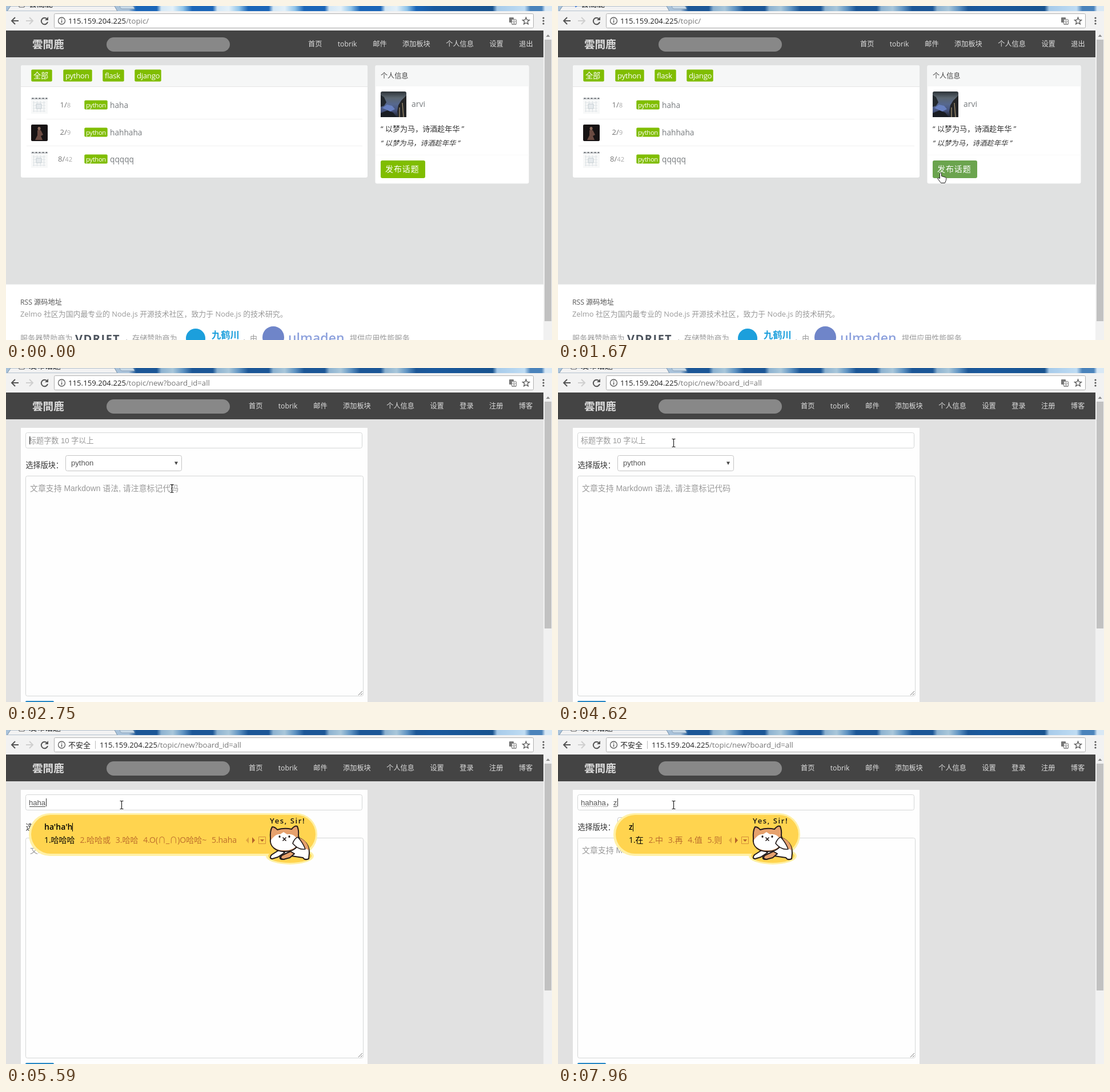
Recreate the animation shown at these times as an HTML page with a canvas. Size 956 by 586 pixels, loop 8 s.

```html
<!DOCTYPE html>
<html lang="zh-CN">
<head>
<meta charset="utf-8">
<title>发布话题</title>
<style>
html, body { margin: 0; width: 100%; height: 100%; overflow: hidden; background: #e1e1e1; }
canvas { display: block; }
</style>
</head>
<body>
<canvas id="stage" width="956" height="586"></canvas>
<script>
const ctx = document.getElementById('stage').getContext('2d');
const LOOP = 8000;
const UI = '"Open Sans", "Noto Sans CJK SC", "Noto Sans CJK", sans-serif';
const FORM = '"Liberation Sans", "Noto Sans CJK SC", "Noto Sans CJK", sans-serif';
const GREEN = '#80bd01';

// time, x, y, shape
const CURSOR = [
  [530, 820, 525, 'arrow'], [620, 800, 488, 'arrow'], [700, 775, 446, 'arrow'],
  [790, 748, 404, 'arrow'], [870, 722, 366, 'arrow'], [950, 703, 338, 'arrow'],
  [1040, 689, 318, 'arrow'], [1120, 681, 305, 'arrow'], [1180, 680, 300, 'arrow'],
  [1310, 678, 297, 'arrow'], [1370, 673, 294, 'hand'], [1500, 668, 292, 'hand'],
  [2000, 648, 294, 'arrow'], [2120, 630, 293, 'arrow'], [2210, 602, 291, 'arrow'],
  [2390, 552, 290, 'beam'], [2520, 488, 277, 'beam'], [2680, 349, 241, 'beam'],
  [2750, 290, 211, 'beam'], [2820, 262, 198, 'beam'], [2960, 245, 188, 'beam'],
  [3230, 231, 179, 'beam'], [3370, 214, 158, 'beam'], [3460, 206, 143, 'beam'],
  [3560, 202, 135, 'beam'], [3720, 202, 132, 'beam'], [4030, 202, 131, 'beam']
];
const CARET = [2750, 3230, 3560, 4620, 5000, 6840, 7200, 7730, 7960];
const HOVER = [[0, 0], [1310, .35], [1370, .7], [1500, 1]];
const CHIP = [[0, 0], [5000, 10], [5160, 51], [5310, 55]];

const H1 = { text: 'h', x: 67, right: 366, words: '好 和 会 很 还' };
const H2 = { text: "ha'h", x: 67, right: 525, words: '哈哈 O(∩_∩)O哈哈~ 好好 haha 和好' };
const H3 = { text: "ha'ha", x: 67, right: 540, words: '哈哈 哈哈哈 O(∩_∩)O哈哈~ 好哈 haha' };
const H4 = { text: "ha'ha'h", x: 67, right: 545, words: '哈哈哈 哈哈或 哈哈 O(∩_∩)O哈哈~ haha' };
const H5 = { ...H4, text: "ha'ha'ha", words: H4.words.replace('或', '蛤') };
const Z = { text: 'z', x: 124, right: 424, words: '在 中 再 值 则' };
// time, field value, input popup
const TYPING = [
  [0, '', null], [5000, 'h', H1], [5160, 'ha', H1], [5310, 'ha', H2], [5450, 'hah', H3],
  [5590, 'haha', H4], [5740, 'hahah', H5], [5870, 'hahaha', H5], [6110, 'hahaha', null],
  [7200, 'hahaha，', null], [7960, 'hahaha，z', Z]
];

const at = (keys, t) => keys.filter(k => k[0] <= t).pop();

function box(x, y, w, h, fill, r = 0, stroke) {
  ctx.beginPath();
  ctx.roundRect(x, y, w, h, r);
  if (fill) { ctx.fillStyle = fill; ctx.fill(); }
  if (stroke) { ctx.strokeStyle = stroke; ctx.lineWidth = 1; ctx.stroke(); }
}

function text(s, x, y, size, color, { font = UI, style = '', gap = 0 } = {}) {
  ctx.font = `${style} ${size}px ${font}`;
  ctx.letterSpacing = gap + 'px';
  ctx.fillStyle = color;
  ctx.fillText(s, x, y);
  const w = ctx.measureText(s).width;
  ctx.letterSpacing = '0px';
  return w;
}

function path(d, fill, stroke, width = 1) {
  const p = new Path2D(d);
  if (fill) { ctx.fillStyle = fill; ctx.fill(p); }
  if (stroke) { ctx.strokeStyle = stroke; ctx.lineWidth = width; ctx.stroke(p); }
}

function disc(x, y, rx, ry, fill) {
  ctx.beginPath();
  ctx.ellipse(x, y, rx, ry, 0, 0, 7);
  ctx.fillStyle = fill;
  ctx.fill();
}

function clipped(x, y, w, h, draw) {
  ctx.save();
  ctx.beginPath();
  ctx.rect(x, y, w, h);
  ctx.clip();
  draw();
  ctx.restore();
}

function glassStrip(t) {
  const dim = t >= 1670;
  const g = ctx.createLinearGradient(0, 0, 956, 0);
  const stop = (x, c) => g.addColorStop(x / 956, c);
  const blue = dim ? '#1c5797' : '#1b66b8', light = dim ? '#8db2d0' : '#d4e8f6';
  stop(0, '#a9c2da');
  stop(215, '#a9c2da');
  stop(228, blue);
  for (let i = 0; i < 5; i++) {
    const x = 230 + i * 98;
    stop(x + 34, blue);
    stop(x + 42, light);
    stop(x + 62, dim ? '#a9c7da' : '#e4f1f9');
    stop(x + 80, dim ? '#5f93c2' : '#8fc4ea');
    stop(x + 96, blue);
  }
  stop(750, '#1a599d');
  stop(852, '#18538f');
  stop(860, '#a7cbea');
  stop(908, '#bfdcf3');
  stop(918, '#4a83bb');
  stop(938, '#4a83bb');
  stop(944, '#d8e8f5');
  ctx.fillStyle = g;
  ctx.fillRect(0, 0, 956, 9);
  path('M2 9L8 0H190L195 9Z', '#f2f2f2', '#7790a8');
  path('M199 0H220Q224 0 225 5H203Q200 5 199 0Z', '#c9dae8', '#8ba3ba');
  clipped(0, 0, 200, 9, () => {
    const loading = t >= 1670 && t < 2750;
    if (loading) {
      ctx.beginPath();
      ctx.arc(28, -4, 6, t / 180, t / 180 + 4.5);
      ctx.strokeStyle = '#4b7fd6';
      ctx.lineWidth = 2;
      ctx.stroke();
    } else path('M23 -10V2H32V-10', '#fff', '#555');
    text(t < 2390 ? '雲間鹿' : '发布话题', 40, 1, 14, '#222');
  });
}

function toolbar(t) {
  const loading = t >= 2120 && t < 2750;
  box(0, 9, 956, 34, '#f2f2f2');
  box(84.5, 13.5, 839, 25, '#fff', 2, '#b1b1b1');
  path('M22 26H10M16 20L10 26L16 32', null, '#555', 2);
  path('M35 26H47M41 20L47 26L41 32', null, '#cfcfcf', 2);
  if (loading) path('M62.5 21L72.5 31M72.5 21L62.5 31', null, '#555', 2);
  else {
    path('M72 23A5.7 5.7 0 1 0 73 28', null, '#555', 2);
    path('M74 19V25H68Z', '#555');
  }
  ctx.beginPath();
  ctx.arc(97.5, 26, 6, 0, 7);
  ctx.strokeStyle = '#5a5a5a';
  ctx.lineWidth = 1.3;
  ctx.stroke();
  box(96.8, 25, 1.5, 4.5, '#5a5a5a');
  box(96.8, 22.3, 1.5, 1.5, '#5a5a5a');

  const shift = at(CHIP, t)[1];
  if (shift) clipped(108, 14, shift - 5, 24, () => {
    text('不安全', 109, 31, 13, '#222');
    box(156, 19, 1, 14, '#bbb');
  });
  const w = text('115.159.204.225', 109 + shift, 31, 13.2, '#222');
  text(t < 2000 ? '/topic/' : '/topic/new?board_id=all', 109 + shift + w, 31, 13.2, '#777');

  if (!loading) {
    box(881, 20, 8, 9, '#777', 1);
    box(885.5, 23.5, 8, 9, '#f8f8f8', 1, '#777');
    text('文', 886, 31, 7, '#666');
  }
  path('M910.5 20L912.2 24.3L916.5 24.6L913.2 27.4L914.3 31.8L910.5 29.4L906.7 31.8L907.8 27.4L904.5 24.6L908.8 24.3Z', null, '#555', 1.3);
  for (const y of [21, 26, 31]) disc(941, y, 1.6, 1.6, '#555');
}

function scrollbar(end) {
  box(941, 43, 15, 543, '#f1f1f1');
  path('M945.5 54L949 50L952.5 54Z', '#8a8a8a');
  box(943, 59, 12, end - 59, '#c1c1c1');
}

function navbar(items, x) {
  box(0, 43, 941, 47, '#444');
  text('雲間鹿', 46, 74, 18.6, '#dcdcdc', { style: '600' });
  box(176, 55, 216, 25, '#888', 12.5);
  for (const s of items) {
    text(s, x, 71, 12.2, '#dedede');
    x += (s === 'tobrik' ? 34 : s.length * 12.2) + 27.4;
  }
}

function tag(s, x, y, w, h, size, pad, base) {
  box(x + .3, y + .4, w - .6, h - .8, GREEN, 2);
  text(s, x + pad, base, size, '#fff', { gap: -.3 });
}

function sketchAvatar(x, y) {
  box(x, y, 29, 29, '#f7f8f8');
  box(x, y + 1, 29, 3, '#c9cccf');
  for (let i = 0; i < 5; i++) box(x + 2 + i * 6, y + 1, 2, 2, '#61656a');
  for (let i = 0; i < 4; i++) {
    box(x + 4 + i * 6, y + 7, 1, 19, '#dbe1e4');
    box(x + 3, y + 9 + i * 5, 22, 1, '#e2e6e9');
  }
  box(x + 9, y + 12, 9, 8, '#e6eaed', 0, '#c3ccd1');
}

function figureAvatar(x, y) {
  box(x, y, 29, 29, '#171314', 2);
  disc(x + 14, y + 7, 2.5, 3, '#8b6a5c');
  path(`M${x + 11} ${y + 10}l6 0l4 8l-4 2l3 7h-13l4 -8z`, '#6b4b42');
}

function landscapeAvatar(x, y) {
  clipped(x, y, 45, 45, () => {
    const g = ctx.createLinearGradient(0, y, 0, y + 45);
    g.addColorStop(0, '#2c3237');
    g.addColorStop(.25, '#5b6670');
    g.addColorStop(.5, '#56688f');
    g.addColorStop(.75, '#44527c');
    g.addColorStop(1, '#1c2027');
    box(x, y, 45, 45, g, 3);
    path(`M${x} ${y + 6}l6 4l4 9l-4 6l-6 2z`, '#22282d');
    path(`M${x} ${y + 38}l12 -5l10 4l6 8h-28z`, '#191d23');
    path(`M${x + 45} ${y + 7}l-9 9l-5 8l-2 11l2 10h14z`, '#232426');
    path(`M${x + 3} ${y + 29}l8 -6l9 2l5 6l-8 4z`, '#6880c0');
    path(`M${x + 38} ${y + 20}l2 25M${x + 33} ${y + 28}v17`, null, '#9a8a6d', 1.4);
  });
}

function topicRow(i, replies, views, title) {
  const y = 160 + i * 47.5;
  if (i === 1) figureAvatar(44, Math.round(y)); else sketchAvatar(44, Math.floor(y));
  const x = views.length > 1 ? 91 : 94.5;
  const w = text(replies + '/', x, y + 18, 13, '#777');
  text(views, x + w, y + 18, 11.3, '#aaa');
  tag('python', 137, Math.round(y + 5), 41, 17, 11.2, 3, y + 18);
  text(title, 182, y + 19, 13.7, '#777b7e');
  if (i) box(36, Math.floor(y - 10 + .5), 588, 1, '#f0f0f0');
}

function footer() {
  box(0, 488.5, 941, 98, '#fff');
  text('RSS 源码地址', 25, 524, 12.2, '#555');
  text('Zelmo 社区为国内最专业的 Node.js 开源技术社区，致力于 Node.js 的技术研究。', 25, 545, 12.9, '#999');
  const note = (s, x) => text(s, x, 588, 13.1, '#999');
  note('服务器赞助商为', 25);
  text('VDRIFT', 121, 591, 20, '#4c535c', { style: 'bold', gap: 1.5 });
  note('，存储赞助商为', 208);
  disc(332, 583, 17, 17, '#1c9fdc');
  text('九鹤川', 360, 583, 16.3, '#1c9fdc', { style: 'bold' });
  note('，由', 414);
  disc(468, 581, 19, 19, '#6f85c9');
  text('ulmaden', 494, 591, 23, '#8ea2dd', { style: '600' });
  note('提供应用性能服务', 602);
}

function listPage(t) {
  box(0, 43, 941, 543, '#e0e1e1');
  navbar(['首页', 'tobrik', '邮件', '添加板块', '个人信息', '设置', '退出'], 529);
  scrollbar(553);

  box(26, 104, 607, 197, '#fff', 3);
  box(26, 104, 607, 37, '#f6f7f7', [3, 3, 0, 0]);
  box(26, 141, 607, 1, '#e5e5e5');
  [['全部', 44, 37], ['python', 100, 51], ['flask', 169, 38], ['django', 225, 47]]
    .forEach(([s, x, w]) => tag(s, x, 111, w, 22, 13.2, 4, 127));
  topicRow(0, '1', '8', 'haha');
  topicRow(1, '2', '9', 'hahhaha');
  topicRow(2, '8', '42', 'qqqqq');

  box(646.5, 104, 269, 207.5, '#fff', 3);
  box(646.5, 104, 269, 37, '#f6f7f7', [3, 3, 0, 0]);
  text('个人信息', 656, 127, 12.1, '#444');
  landscapeAvatar(656, 150);
  text('arvi', 710, 177, 14, '#777b7e');
  text('“ 以梦为马，诗酒趁年华 ”', 656, 220, 13.05, '#333');
  text('“ 以梦为马，诗酒趁年华 ”', 656, 245, 12.4, '#333', { style: 'italic' });
  box(646.5, 261, 269, 1, '#f9f9f9');
  const k = at(HOVER, t)[1];
  box(656, 271, 78, 31, `rgb(${128 - 21 * k},${189 - 25 * k},${1 + 77 * k})`, 3);
  text('发布话题', 664, 291, 14, '#fff', { gap: .9 });
  footer();
}

function field(value, composing, t) {
  const opt = { font: FORM };
  let end = 41;
  if (!value) text('标题字数 10 字以上', 40, 132, 13.1, '#999', opt);
  else {
    end = 40.5 + text(value, 40, 132, 13.1, '#555', opt);
    const wordEnd = 84;
    if (value.startsWith('hahaha') && t >= 6240) {
      for (let x = 41; x < wordEnd; x += 2) box(x, 133 + (x % 4 === 1 ? 0 : 1), 1.5, 1, '#999');
    }
    if (composing || t < 6240) {
      const from = value.endsWith('z') ? 97 : 41;
      box(from, 134, end - from - .5, 1, '#444');
    }
  }
  if (CARET.filter(c => c <= t).length % 2) box(Math.round(end), 120, 1, 14, '#333');
}

function formPage(t) {
  box(0, 43, 941, 543, '#e1e1e1');
  navbar(['首页', 'tobrik', '邮件', '添加板块', '个人信息', '设置', '登录', '注册', '博客'], 425);
  scrollbar(457);
  box(26, 105, 607, 481, '#fefefe');
  box(34.5, 113.5, 589, 27, '#fff', 3, '#d4d6d6');
  const [, value, popup] = at(TYPING, t);
  field(value, popup, t);
  text('选择版块：', 34.5, 175, 13.1, '#333');
  box(104.5, 153.5, 203, 27, '#fff', 3, '#c4c4c4');
  text('python', 114, 171, 13.1, '#555', { font: FORM });
  path('M295 164.5H301L298 170Z', '#444');
  box(34.5, 189.5, 591, 386, '#fefefe', 3, '#d4d6d6');
  text('文章支持 Markdown 语法, 请注意标记代码', 42, 216, 13.9, '#999', { font: FORM });
  path('M617 574L624 567M621 574L624 571', null, '#777');
  box(34, 584, 50, 4, '#2586c4', 3);
  if (popup) inputPopup(popup);
}

function dog(right) {
  ctx.save();
  ctx.translate(right - 545, 0);
  ctx.lineJoin = ctx.lineCap = 'round';
  const ink = '#241b1a', tan = '#e6a16d';
  path('M500 190C514 184 532 198 531 216L530 226Q523 229 520 224L500 221L486 227Q478 228 480 221L492 205Z', '#fff', ink, 2);
  path('M511 189C521 190 530 200 530 211Q519 207 511 189Z', tan);
  path('M479 210L465 219Q460 225 466 226L476 223L488 215Z', '#fff', ink, 2);
  path('M498 213L483 220Q478 226 486 227L497 224L505 217Z', tan, ink, 2);
  path('M463 190Q462 177 466 170Q471 170 475 175Q487 171 500 174Q506 167 510 169Q513 176 512 185C518 201 506 213 490 213C473 214 461 205 463 190Z', tan, ink, 2);
  path('M464 193Q473 181 480 183L486 179L492 183Q503 181 510 191C514 203 503 211 490 211C474 212 463 205 464 193Z', '#fff');
  disc(479, 187, 1.6, 2, ink);
  disc(496, 187, 1.6, 2, ink);
  path('M485 189L490 194M490 189L485 194', null, ink, 1.7);
  path('M502 199Q505 190 511 188Q520 198 524 209Q512 211 502 199Z', '#fff', ink, 1.6);
  text('Yes, Sir!', 462, 164, 13, '#151515', { style: '600', gap: 1.6 });
  ctx.restore();
}

function inputPopup({ text: typed, x, right, words }) {
  const left = x - 27, cx = right - 48;
  box(left, 146, right - left, 75, '#fff0a6', 37);
  disc(cx, 221, 42, 15, '#fff0a6');
  box(left + 4, 149, right - left - 7, 68, '#ffd44f', 34);
  disc(cx, 221, 38, 12, '#ffd44f');
  const w = text(typed, x, 175, 14, '#000', { style: '600' });
  box(Math.round(x + w), 163, 1, 15, '#000');
  let pen = x;
  words.split(' ').forEach((word, i) => {
    pen += text(`${i + 1}.${word}`, pen, 198, 14.1, i ? '#bd6e2c' : '#000', { gap: -.1 }) + 8.8;
  });
  const a = right - 125;
  path(`M${a + 5} 188v11l-5 -5.5z`, '#e0a640');
  path(`M${a + 11} 188v11l5 -5.5z`, '#b5642a');
  box(a + 22.5, 187.5, 12, 12, null, 0, '#d58f38');
  path(`M${a + 25} 192h7l-3.5 4z`, '#b5642a');
  dog(right);
}

function cursor(t) {
  const key = at(CURSOR, t);
  if (!key) return;
  const [, x, y, shape] = key;
  ctx.save();
  ctx.translate(x + .5, y + .5);
  if (shape === 'arrow') path('M0 0V15L3.5 12L6 18L8.5 17L6 11H10.5Z', '#fff', '#222');
  else if (shape === 'hand') path('M0 1Q1.5 -1 3 1V6L10 8Q12 9 11 13L9 18H2L-4 10Q-3 8 0 10Z', '#fff', '#222');
  else path('M-3 -7H-1L0 -6L1 -7H3M0 -6V6M-3 7H-1L0 6L1 7H3', null, '#222', 1.2);
  ctx.restore();
}

function draw(now) {
  const t = now % LOOP;
  ctx.clearRect(0, 0, 956, 586);
  if (t < 2750) listPage(t); else formPage(t);
  glassStrip(t);
  toolbar(t);
  cursor(t);
}

const start = performance.now();
function tick() {
  draw(performance.now() - start);
  requestAnimationFrame(tick);
}
tick();
</script>
</body>
</html>
```
